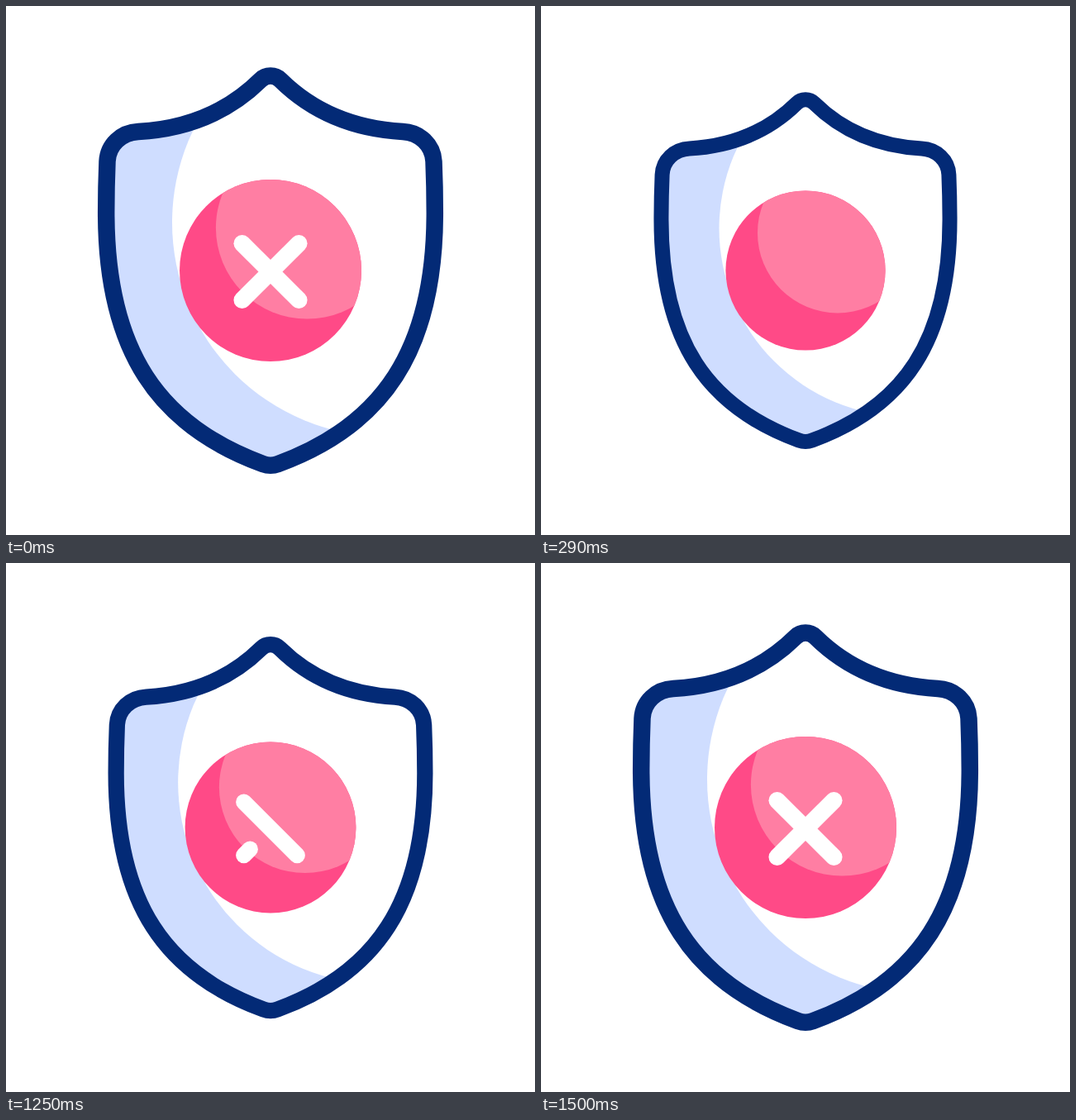
Recreate the animation shown at these times as an HTML page. Size 640 px wide and 640 px high, loop 2040 ms.

```html
<!DOCTYPE html>
<html lang="en">
<head>
<meta charset="utf-8">
<title>Shield with cross</title>
<style>
  html, body { margin: 0; width: 100%; height: 100%; overflow: hidden; background: #fff; }
  svg { display: block; width: 100%; height: 100%; }
</style>
</head>
<body>
<svg viewBox="0 0 640 640">
  <defs>
    <path id="shield" d="M308 89.5A17 17 0 0 1 332 89.5C370 127 418 148.5 480 152
      C500.5 153 516.5 168 517.5 188Q518.8 219 518.8 250
      C518.8 418 455 508 329 554.1A25.6 25.6 0 0 1 311 554.1
      C185 508 121.2 418 121.2 250Q121.2 219 122.5 188
      C123.5 168 139.5 153 160 152C222 148.5 270 127 308 89.5Z"/>
    <clipPath id="inShield"><use href="#shield"/></clipPath>
    <clipPath id="inBadge"><circle cx="320" cy="320" r="110"/></clipPath>
  </defs>
  <g id="icon">
    <g clip-path="url(#inShield)">
      <use href="#shield" fill="#cfddff"/>
      <circle cx="460" cy="262" r="259" fill="#fff"/>
    </g>
    <use href="#shield" fill="none" stroke="#032a76" stroke-width="20.5"/>
    <circle cx="320" cy="320" r="110" fill="#ff4a87"/>
    <circle cx="364.3" cy="268.2" r="110.4" fill="#ff7ea3" clip-path="url(#inBadge)"/>
    <g stroke="#fff" stroke-width="20.5" stroke-linecap="round">
      <line id="falling"/>
      <line id="rising"/>
    </g>
  </g>
</svg>
<script>
  const LOOP = 2040, FPS = 24, SMALL = 0.878;
  const CENTER = { x: 320, y: 321.5 }, ARM = 34.3;
  const byId = id => document.getElementById(id);
  const icon = byId('icon');

  // All motion times below are in steps of 1/24 s.
  const progress = (step, from, to) => Math.min(1, Math.max(0, (step - from) / (to - from)));

  // Same curve as CSS ease-in-out: cubic-bezier(.42, 0, .58, 1).
  function ease(x) {
    let lo = 0, hi = 1;
    for (let i = 0; i < 24; i++) {
      const t = (lo + hi) / 2, u = 1 - t;
      if (1.26 * u * u * t + 1.74 * u * t * t + t * t * t < x) lo = t; else hi = t;
    }
    return lo * lo * (3 - 2 * lo);
  }

  const strokes = [
    { line: byId('falling'), slope: 1, erase: [0, 5.6], draw: [24, 29.84] },
    { line: byId('rising'), slope: -1, erase: [2, 7], draw: [28.6, 34.5] }
  ];

  function drawStroke({ line, slope, erase, draw }, step) {
    const drawing = step >= draw[0];
    const start = drawing ? 0 : ease(progress(step, ...erase));
    const end = drawing ? ease(progress(step, ...draw)) : 1;
    const set = (n, part) => {
      const offset = ARM * (2 * part - 1);
      line.setAttribute('x' + n, CENTER.x + offset);
      line.setAttribute('y' + n, CENTER.y + offset * slope);
    };
    set(1, start);
    set(2, end);
    line.style.display = drawing || step < erase[1] ? '' : 'none';
  }

  function render(now) {
    const time = Math.floor((now % LOOP) / 10) * 10;
    const step = Math.floor((time + 5.01) * FPS / 1000);
    const shrink = ease(progress(step, 0, 3.1));
    const grow = ease(progress(step, 24.1, 35.8));
    const scale = 1 - (1 - SMALL) * (shrink - grow);
    icon.setAttribute('transform', `translate(320 320) scale(${scale}) translate(-320 -320)`);
    strokes.forEach(stroke => drawStroke(stroke, step));
  }

  function tick() {
    render(performance.now());
    requestAnimationFrame(tick);
  }
  tick();
</script>
</body>
</html>
```
